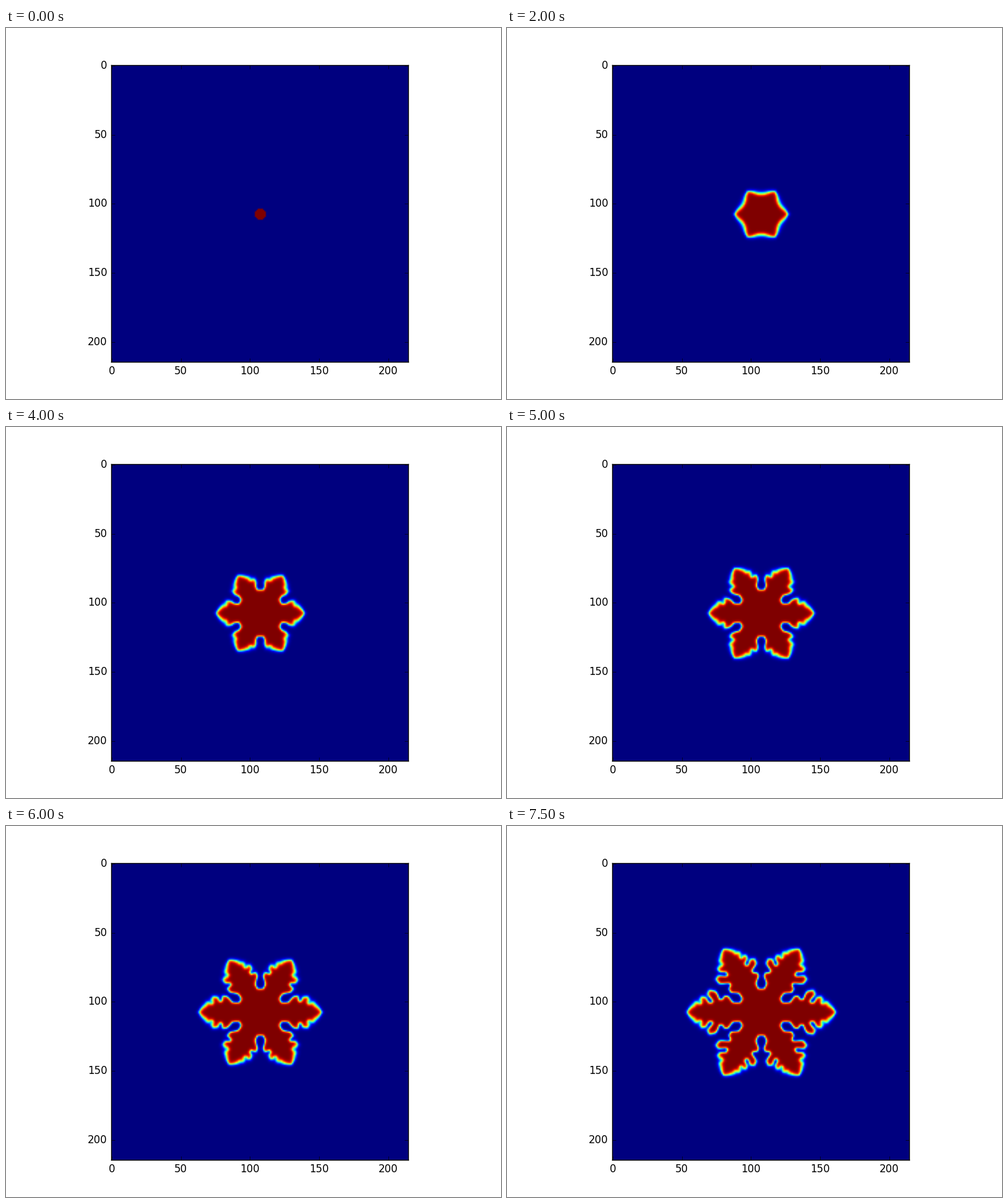
These frames come from a looping animation (800 by 600 pixels, 8 s). A matplotlib script:

```python
import numpy as np
import matplotlib.pyplot as plt
from matplotlib.animation import FuncAnimation

plt.rcParams.update({
    "font.family": "DejaVu Sans", "font.size": 12, "axes.linewidth": 1.0,
    "ytick.alignment": "center", "text.hinting": "auto",
    "text.kerning_factor": 6,
})

N, FRAMES, STEP_MS = 215, 16, 500
MID, HALF = 108, 80          # crystal centre and size of one quadrant, in cells

# Phase-field model of a crystal growing into an undercooled melt
DX, DT, TAU = 0.03, 1e-4, 3e-4
EPS, DELTA, FOLD = 0.01, 0.04, 6
ALPHA, GAMMA, LATENT = 0.9, 10.0, 1.6
MAX_STEPS = 8000


def neighbours(f, axis, parity=1):
    """Cells before and after; the field is mirrored at the centre."""
    before, after = np.roll(f, 1, axis), np.roll(f, -1, axis)
    before.swapaxes(0, axis)[0] = parity * f.swapaxes(0, axis)[0]
    after.swapaxes(0, axis)[-1] = f.swapaxes(0, axis)[-1]
    return before, after


def slope(f, axis, parity=1):
    before, after = neighbours(f, axis, parity)
    return (after - before) / (2 * DX)


def laplacian(f):
    return (sum(neighbours(f, 0)) + sum(neighbours(f, 1)) - 4 * f) / DX ** 2


def advance(phi, temp):
    gx, gy = slope(phi, 1), slope(phi, 0)
    z = gx + 1j * gy
    z /= np.maximum(np.abs(z), 1e-30)
    z3 = z * z * z
    z6 = z3 * z3
    eps = EPS * (1 + DELTA * z6.real)
    twist = -FOLD * EPS * DELTA * z6.imag * eps
    eps2 = eps * eps
    drive = ALPHA / np.pi * np.arctan(GAMMA * (1 - temp))
    rate = (slope(twist * gx, 0, -1) - slope(twist * gy, 1, -1)
            + slope(eps2, 1) * gx + slope(eps2, 0) * gy
            + eps2 * laplacian(phi)
            + phi * (1 - phi) * (phi - 0.5 + drive))
    change = DT / TAU * rate
    return phi + change, temp + DT * laplacian(temp) + LATENT * change


def reach(k):
    """Length of the horizontal arm, in cells."""
    return 6.3 + 3.13 * k - 8.5 * np.exp(-1.35 * k)


def unfold(q):
    full = np.zeros((N, N))
    block = slice(MID - HALF, MID + HALF)
    full[block, block] = np.block([[q[::-1, ::-1], q[::-1]], [q[:, ::-1], q]])
    return full


def grow():
    c = np.arange(HALF) + 0.5
    phi = (c[:, None] ** 2 + c ** 2 < 16).astype(float)
    temp = np.zeros_like(phi)
    stages, steps = [unfold(phi)], 0
    for k in range(1, FRAMES):
        while phi[0].sum() < reach(k) and steps < MAX_STEPS:
            phi, temp = advance(phi, temp)
            steps += 1
        stages.append(unfold(phi))
    return stages


stages = grow()

fig = plt.figure(figsize=(8, 6), dpi=100, facecolor="white")
ax = fig.add_axes([170 / 800, 0.1, 0.6, 0.8])
image = ax.imshow(stages[0], cmap="jet", vmin=0, vmax=1, aspect="auto",
                  interpolation="bilinear", interpolation_stage="rgba")
ax.set_xticks(range(0, 201, 50))
ax.set_yticks(range(0, 201, 50))
ax.tick_params(direction="in", length=4, width=0.5, pad=4, top=True, right=True)
ax.tick_params(axis="y", pad=4.5)


def update(k):
    image.set_data(stages[k])
    return [image]


anim = FuncAnimation(fig, update, frames=FRAMES, interval=STEP_MS,
                     repeat=True, repeat_delay=0, blit=False)
plt.show()
```
